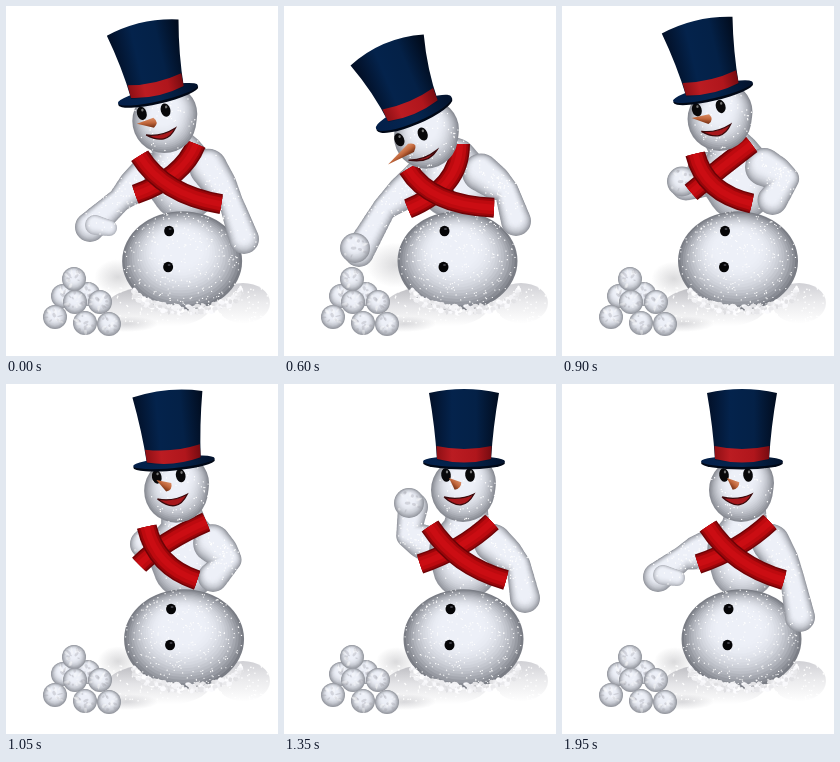
Write an HTML page with a canvas that moves like this. It is 272 px wide and 350 px high and loops after 4950 ms.

```html
<!DOCTYPE html>
<html lang="en">
<head>
<meta charset="utf-8">
<title>Snowman</title>
<style>
html, body { margin: 0; width: 100%; height: 100%; overflow: hidden; background: #fff }
canvas { display: block }
</style>
</head>
<body>
<canvas id="stage" width="272" height="350"></canvas>
<script>
const g = document.getElementById('stage').getContext('2d');
const TAU = Math.PI * 2;

// Key poses by step; all other parts follow from the spine and the two hands.
const spine = [ // step, lean, bow, twist
  [0, .56, .35, 0], [1, 1, 1, 0], [3, 1, .95, 0], [4, .92, .5, .8], [6, .24, .03, 1], [8, 0, 0, 0]];
const leftHand = [ // step, x, y, elbow bend
  [0, 84, 221, 0], [1, 79, 243, 9], [3, 75, 246, 9], [4, 105, 195, -18], [6, 143, 164, 0],
  [8, 129, 123, -18], [9, 95, 148, -8], [10, 113, 181, 6], [12, 96, 193, 5]];
const rightHand = [
  [0, 238, 233, -5], [1, 237, 227, -7], [3, 232, 215, -10], [4, 214, 195, -22], [6, 207, 193, -17],
  [8, 241, 214, -11], [10, 257, 218, -10], [12, 238, 233, -7]];

function at(track, step) {
  const i = track.findLastIndex(row => row[0] <= step);
  const a = track[i], b = track[i + 1] || a;
  const k = (step - a[0]) / (b[0] - a[0] || 1);
  return a.slice(1).map((v, j) => v + (b[j + 1] - v) * (b === a ? 0 : k));
}

let seed = 1;
const rnd = () => (seed = seed * 16807 % 2147483647) / 2147483647;

function oval(x, y, rx, ry, fill, turn = 0) {
  g.fillStyle = fill;
  g.beginPath();
  g.ellipse(x, y, rx, ry, turn, 0, TAU);
  g.fill();
}

function soft(x, y, rx, ry, rgb, alpha, core = 0) {
  const fade = g.createRadialGradient(0, 0, core, 0, 0, 1);
  fade.addColorStop(0, `rgba(${rgb},${alpha})`);
  fade.addColorStop(1, `rgba(${rgb},0)`);
  g.save();
  g.translate(x, y);
  g.scale(rx, ry);
  oval(0, 0, 1, 1, fade);
  g.restore();
}

function shades(x0, y0, x1, y1, ...colors) {
  const paint = g.createLinearGradient(x0, y0, x1, y1);
  colors.forEach((c, i) => paint.addColorStop(i / (colors.length - 1), c));
  return paint;
}

// A rounded snow form along points [x, y, radius], lit from above.
function snow(points, dark = 90, specks = 40) {
  const discs = [];
  points.forEach((p, i) => {
    const q = points[i + 1] || p;
    for (let k = 0; k < (q === p ? 1 : 12); k++) discs.push(p.map((v, j) => v + (q[j] - v) * k / 12));
  });
  for (let f = 0; f <= 1; f += 1 / 16) {
    const v = 240 - dark * (1 - f) ** 2.2;
    g.fillStyle = `rgb(${v - 3},${v},${v + 8})`;
    g.beginPath();
    for (const [x, y, r] of discs) {
      const cx = x - .04 * r * f, cy = y - .26 * r * f, cr = r * (1 - .68 * f);
      g.moveTo(cx + cr, cy);
      g.arc(cx, cy, cr, 0, TAU);
    }
    g.fill();
  }
  for (let i = 0; i < specks; i++) {
    const [x, y, r] = discs[Math.floor(rnd() * discs.length)];
    const a = rnd() * TAU, d = r * Math.sqrt(rnd());
    oval(x + d * Math.cos(a), y + d * Math.sin(a), .7, .7, '#fff');
  }
}

function snowball(x, y, r) {
  snow([[x, y, r]], 90, 0);
  for (let i = 0; i < 16; i++) {
    const a = rnd() * TAU, d = r * .8 * Math.sqrt(rnd()), v = i % 2 ? 255 : 160;
    oval(x + d * Math.cos(a), y + d * Math.sin(a), 1 + rnd() * 2, .7 + rnd(), `rgba(${v},${v},${v + 8},.35)`, a);
  }
}

function ground(bow) {
  soft(112, 278 - 20 * bow, 20 + 10 * bow, 15 + 8 * bow, '150,150,155', .35);
  oval(237, 297, 27, 20, shades(0, 276, 0, 318, '#cfcfd4', '#ececee', '#fff'));
  oval(152, 301, 52, 21, shades(0, 280, 0, 320, '#b9b9be', '#e4e4e7', '#fff'));
  soft(120, 318, 32, 8, '170,170,176', .45);
  for (let i = 0; i < 160; i++) oval(102 + 160 * rnd(), 282 + 36 * rnd(), .8, .8, '#fff');
}

function pile() {
  for (const [x, y] of [[57, 290], [82, 288], [68, 273], [49, 311], [69, 296], [94, 296], [79, 317], [103, 318]])
    snowball(x, y, 12);
}

function belly(x) {
  g.save();
  g.translate(x, 255);
  g.scale(1, .83);
  snow([[0, 0, 60]], 115, 300);
  g.restore();
  for (let i = 0; i < 260; i++) {
    const a = Math.PI * (.04 + .92 * rnd()), v = 222 + rnd() * 33;
    oval(181 + 54 * Math.cos(a), 278 + 22 * Math.sin(a) + rnd() * 8, 1 + rnd() * 2, 1 + rnd() * 1.5,
      `rgb(${v},${v},${v + 3})`);
  }
  button(x - 13, 225);
  button(x - 14, 261);
}

function button(x, y) {
  oval(x, y, 5, 5.3, '#050507');
  oval(x + 1, y - 2, 1.5, 1, '#44444c');
}

function arm(sx, sy, [hx, hy, bend]) {
  const dx = hx - sx, dy = hy - sy, len = Math.hypot(dx, dy);
  const ex = (sx + hx) / 2 - dy / len * bend, ey = (sy + hy) / 2 + dx / len * bend;
  snow([[sx, sy, 19], [sx + (ex - sx) * .5, sy + (ey - sy) * .5, 17], [ex, ey, 12], [hx, hy, 15]], 90, 70);
}

function ribbon(x0, y0, x1, y1, x2, y2) {
  for (const [width, color] of [[20, '#6e0306'], [17, '#9a060a'], [13, '#bd0a0f'], [6, '#cb0d13']]) {
    g.strokeStyle = color;
    g.lineWidth = width;
    g.beginPath();
    g.moveTo(x0, y0);
    g.quadraticCurveTo(x1, y1, x2, y2);
    g.stroke();
  }
}

function face(x, y, lean, bow) {
  g.save();
  g.translate(x, y);
  g.rotate(-.24 * lean);
  for (const side of [-12, 12]) {
    if (bow > .96) {
      g.strokeStyle = '#9a9ca8';
      g.lineWidth = 1.2;
      g.beginPath();
      g.arc(side, 3, 5, .3, Math.PI - .3);
      g.stroke();
    } else {
      oval(side, 0, 4.8, 6.8, '#08080a', -.15);
      oval(side + 1, -3, 1.2, 1.4, '#777');
    }
  }
  g.translate(1 + 6 * lean, 22);
  g.beginPath();
  g.moveTo(-15, 0);
  g.quadraticCurveTo(0, 4, 15, -3);
  g.quadraticCurveTo(4, 17 - 9 * bow, -15, 0);
  g.fillStyle = '#a8181c';
  g.fill();
  g.strokeStyle = '#3a090b';
  g.lineWidth = 1.3;
  g.stroke();
  g.restore();

  const by = y + 11, dx = -9 - 14 * lean, dy = -8 + 26 * bow, len = Math.hypot(dx, dy);
  const ux = -dy / len * 5, uy = dx / len * 5;
  g.fillStyle = shades(x - ux, by - uy, x + ux, by + uy, '#6e2c12', '#c0653a', '#dc9068');
  g.beginPath();
  g.moveTo(x + ux, by + uy);
  g.lineTo(x + dx, by + dy);
  g.lineTo(x - ux, by - uy);
  g.quadraticCurveTo(x - dx * .35, by - dy * .35, x + ux, by + uy);
  g.fill();
}

function hat(x, y, lean, bow) {
  const top = 35 + 5 * bow, rim = 5.5 + 4 * bow, across = (...colors) => shades(-36, 0, 36, 0, ...colors);
  g.save();
  g.translate(x, y);
  g.rotate(-.4 * lean);
  oval(0, 1, 41, rim + 1, '#010816');
  oval(0, -.6, 41, rim, across('#04204a', '#052650', '#03142f'));
  g.fillStyle = across('#020f26', '#04234c', '#042147', '#010b1c');
  g.beginPath();
  g.moveTo(-top, -69);
  g.quadraticCurveTo(-29, -35, -27, -2);
  g.quadraticCurveTo(0, 5, 27, -2);
  g.quadraticCurveTo(29, -35, top, -69);
  g.quadraticCurveTo(0, -77 - 6 * bow, -top, -69);
  g.fill();
  g.fillStyle = across('#75080d', '#bb1c22', '#b0161c', '#58050a');
  g.beginPath();
  g.moveTo(-27.5, -16);
  g.quadraticCurveTo(0, -10, 27.5, -16);
  g.lineTo(27, -3);
  g.quadraticCurveTo(0, 4, -27, -3);
  g.fill();
  g.restore();
}

function draw(step) {
  seed = 7;
  const [lean, bow, twist] = at(spine, step), left = at(leftHand, step);
  const cx = 182 - 12 * lean, cy = 168 + 8 * bow, waist = 179.5 - 6 * lean;
  const hatX = 180 - 50 * lean, hatY = 78 + 31 * bow;
  const hx = hatX + 1 + 13 * lean, hy = hatY + 27 - 5 * bow;

  g.clearRect(0, 0, 272, 350);
  ground(bow);
  pile();

  arm(cx - 31, cy - 5, left);
  const [lx, ly] = left;
  if (step > 2 && step < 10) snowball(lx - 4, ly - 4, 15);
  else snow([[lx + 5, ly - 2, 10], [lx + 19, ly + 1, 8]], 60, 8);

  snow([[hx + 3, hy + 22, 20], [cx, cy - 20, 24], [cx, cy, 37], [waist + 2, 182, 33]], 90, 120);
  belly(waist);
  arm(cx + 27, cy - 9, at(rightHand, step));
  button(cx - 5 - 23 * twist, cy - 5 + 17 * bow);
  ribbon(cx + 26 - 20 * lean, 138, cx - 4 - 20 * twist + 10 * lean, cy - 2 + 8 * bow - 10 * twist, cx - 46, 180 + 24 * bow);
  ribbon(cx - 36 - 10 * lean, 142 + 22 * bow, cx - 10 - 14 * lean - 16 * twist, 182 + 18 * bow, cx + 40 - 28 * twist, 196 + 6 * bow);

  snow([[hx + 1, hy - 6, 30], [hx - 2, hy + 1, 32]], 100, 60);
  face(hx - 7 - 10 * lean, hy - 14 + 16 * bow, lean, bow);
  hat(hatX, hatY, lean, bow);

  if (step === 10) {
    soft(34, 152, 34, 22, '214,217,226', 1, .5);
    soft(42, 157, 19, 9, '115,117,125', .5);
  }
}

let shown = -1;
function frame(now) {
  const t = now % 4950;
  const step = t < 300 ? 0 : Math.min(12, Math.floor((t - 300) / 150) + 1);
  if (step !== shown) draw(shown = step);
  requestAnimationFrame(frame);
}
frame(0);
</script>
</body>
</html>
```
